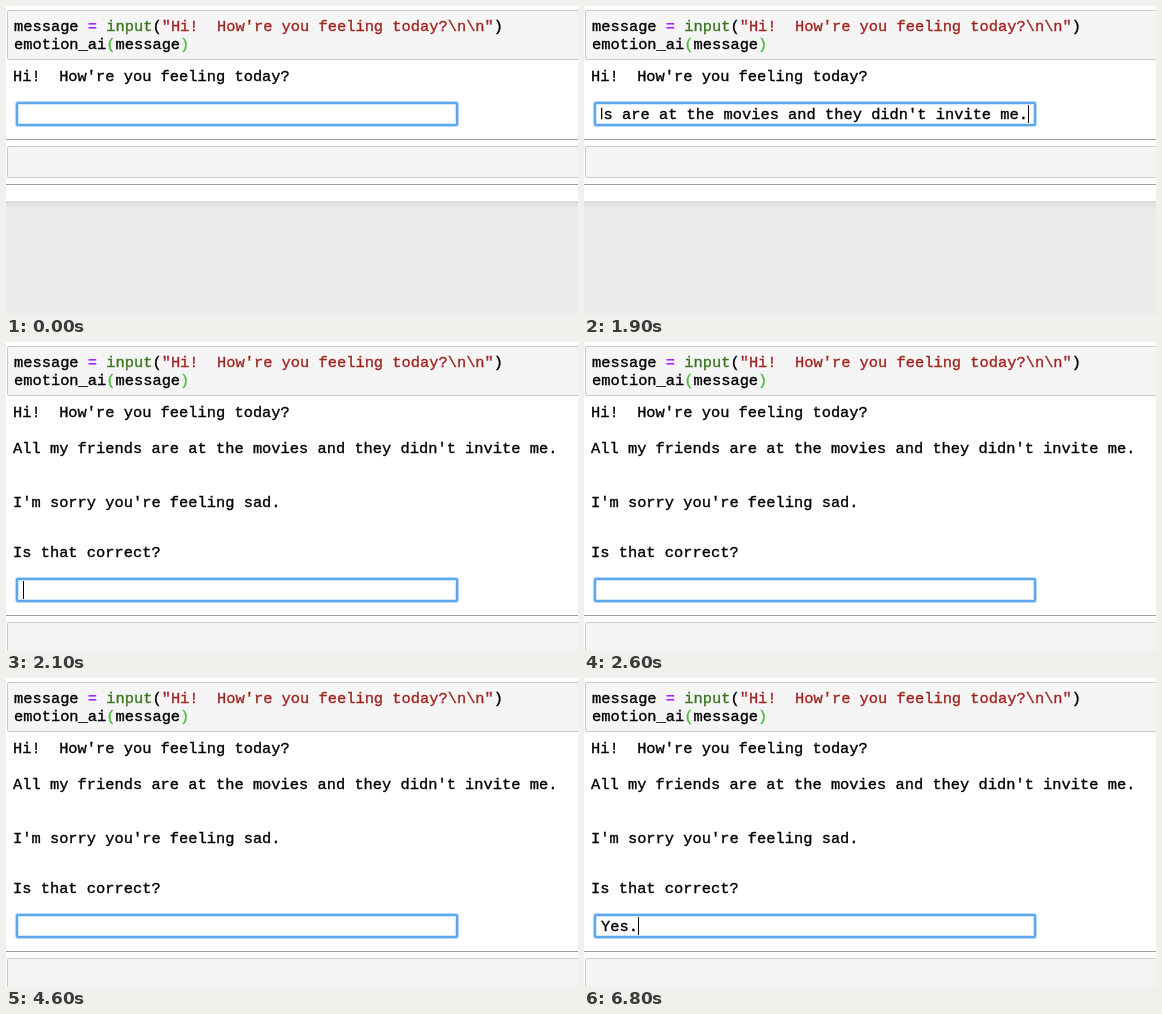
An HTML page for the animation above (7.1 s loop, 572x308 px).

```html
<!DOCTYPE html>
<html lang="en">
<head>
<meta charset="utf-8">
<title>Notebook chat</title>
<style>
html, body { margin: 0; width: 100%; height: 100%; overflow: hidden; background: #fff; }
#stage {
  position: relative; width: 572px; height: 308px; overflow: hidden; background: #fff;
  font: 15.39px/18px "Liberation Mono", "Courier New", monospace;
  -webkit-text-stroke: 0.35px; color: #000; white-space: pre;
}
#stage div { position: absolute; box-sizing: border-box; }
.head, .foot, .field, .echo, .reply, .message, .answer, .caret, .blink {
  animation: 7100ms step-end infinite;
}
.head, .foot { left: 0; top: 0; }
.cell { left: 1px; width: 600px; background: #f5f5f5; border: 1px solid #cacaca; border-radius: 2px; }
.rule { left: 0; width: 572px; height: 1px; background: #a0a0a0; }
.page { left: 0; top: 195px; width: 572px; height: 120px; background: linear-gradient(#dadada, #e5e5e5 4px, #ebebeb 10px); }
.out { left: 7px; }
.op { color: #a2f; font-weight: bold; -webkit-text-stroke: 0; }
.fn { color: #3a751f; }
.str { color: #a02420; }
.match { color: #4cb944; }

.field {
  left: 10px; top: 96px; width: 442px; height: 24px; background: #fff;
  border: 2px solid #5ba6ec; border-radius: 2px;
  box-shadow: 0 0 1px 1px #b4d8f8, inset 0 0 1px 1px #d0e6fa;
}
.view { left: 5px; top: 1px; width: 430px; height: 19px; overflow: hidden; }
.message { right: 3px; top: 1px; }
.answer { left: 0; top: 1px; width: 0; overflow: hidden; }
.caret { left: 0; top: 0; }
.blink { left: 0; top: 0; width: 1px; height: 18px; background: #000; }

.head { animation-name: nudge; }
.foot { animation-name: push; }
.field { animation-name: field; }
.echo { animation-name: echo; }
.reply { animation-name: reply; }
.message { animation-name: message; }
.answer { animation-name: type; }
.caret { animation-name: caret; }
.blink { animation-name: blink; }

@keyframes nudge {
  0%, 29.57% { transform: none; }
  28.16% { transform: translateY(2px); }
}
@keyframes push {
  0% { transform: none; }
  28.16% { transform: translateY(-2px); }
  29.57%, 100% { transform: translateY(140px); }
}
@keyframes field {
  0% { transform: none; visibility: visible; }
  28.16% { transform: none; visibility: hidden; }
  29.57%, 100% { transform: translateY(140px); visibility: visible; }
}
@keyframes echo {
  0% { opacity: 0; }
  28.16%, 100% { opacity: 1; }
}
@keyframes reply {
  0% { opacity: 0; }
  29.57%, 100% { opacity: 1; }
}
@keyframes message {
  0%, 28.16%, 100% { opacity: 0; }
  12.67% { opacity: 1; }
}
@keyframes type {
  0% { width: 0; }
  71.83% { width: 1ch; }
  73.23% { width: 2ch; }
  76.05% { width: 3ch; }
  80.28%, 100% { width: 4ch; }
}
@keyframes caret {
  0%, 28.16% { transform: none; }
  12.67% { transform: translateX(427px); }
  71.83% { transform: translateX(9px); }
  73.23% { transform: translateX(18px); }
  76.05% { transform: translateX(28px); }
  80.28%, 100% { transform: translateX(37px); }
}
@keyframes blink {
  0%, 19.71%, 36.61%, 50.7%, 64.78%, 87.32% { opacity: 0; }
  7.04%, 26.76%, 43.66%, 57.74%, 71.83%, 95.77%, 100% { opacity: 1; }
}
</style>
</head>
<body>
<div id="stage">
  <div class="foot">
    <div class="rule" style="top:133px"></div>
    <div class="cell" style="top:140px;height:32px"></div>
    <div class="rule" style="top:178px"></div>
    <div class="page"></div>
  </div>
  <div class="head">
    <div class="cell" style="top:4px;height:50px"></div>
    <div style="left:8px;top:12px">message <span class="op">=</span> <span class="fn">input</span>(<span class="str">"Hi!  How're you feeling today?\n\n"</span>)</div>
    <div style="left:8px;top:30px">emotion_ai<span class="match">(</span>message<span class="match">)</span></div>
    <div class="out" style="top:62px">Hi!  How're you feeling today?</div>
    <div class="out echo" style="top:98px">All my friends are at the movies and they didn't invite me.</div>
    <div class="out reply" style="top:152px">I'm sorry you're feeling sad.</div>
    <div class="out reply" style="top:202px">Is that correct?</div>
  </div>
  <div class="field">
    <div class="view">
      <div class="message">All my friends are at the movies and they didn't invite me.</div>
      <div class="answer">Yes.</div>
      <div class="caret"><div class="blink"></div></div>
    </div>
  </div>
</div>
</body>
</html>
```
